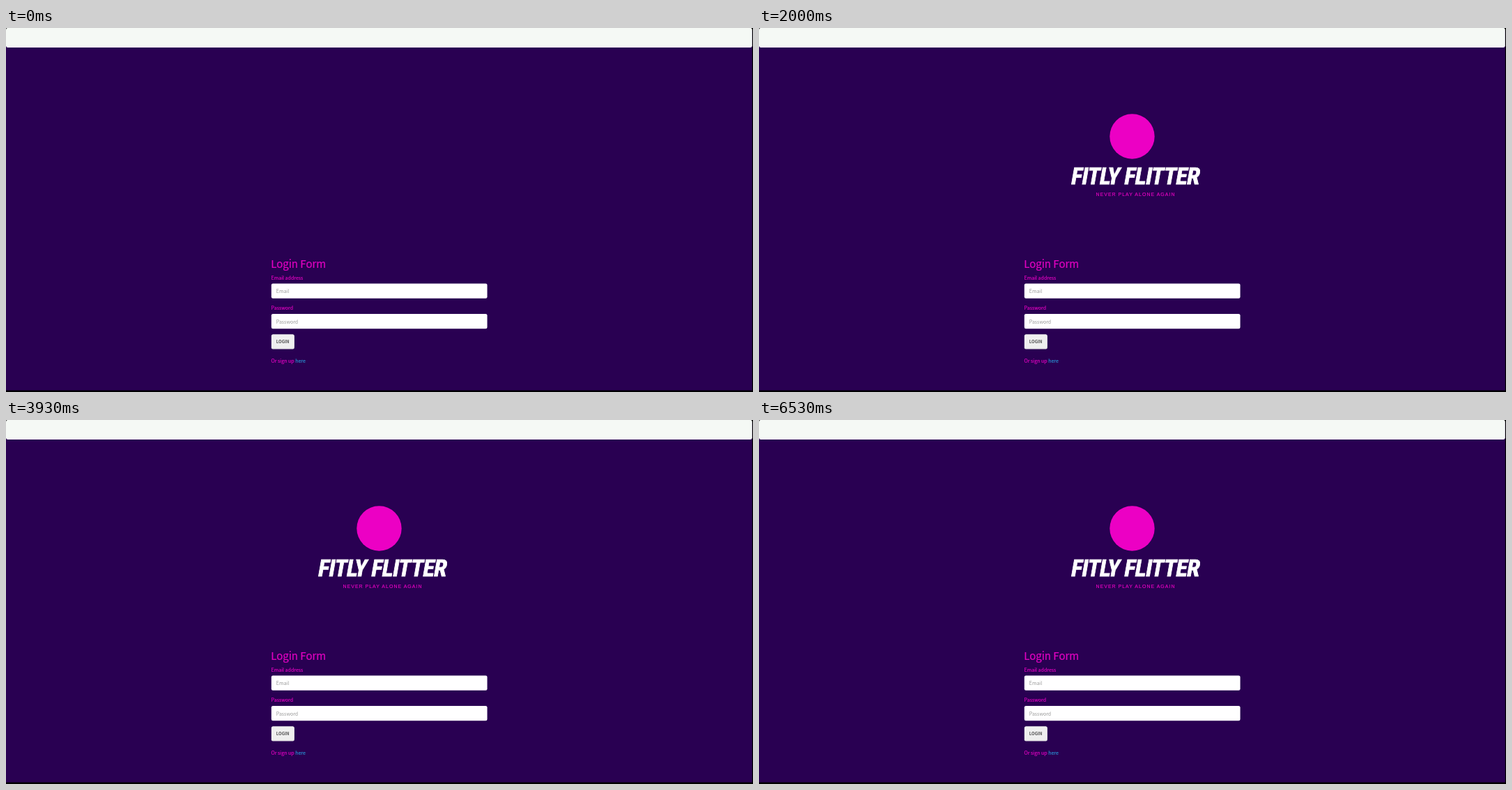
Recreate the animation shown at these times as an HTML page. Size 1072 by 522 pixels, loop 6.66 s.

```html
<!DOCTYPE html>
<html lang="en">
<head>
<meta charset="utf-8">
<title>Login</title>
<style>
  html, body { margin: 0; width: 100%; height: 100%; overflow: hidden; background: #290052; }
  svg { display: block; width: 100%; height: 100%; }

  .form { font: 400 7px "Noto Sans CJK JP", "Noto Sans CJK SC", "Noto Sans CJK", "Open Sans", sans-serif; fill: #e000c0; }
  .form .label { stroke: #e000c0; stroke-width: .16; }
  .form .head { font-size: 15px; stroke-width: .2; }
  .form .hint { fill: #999; }
  .form .link { fill: #2a8fd0; stroke: #2a8fd0; }
  .form .btn { font-size: 6px; font-weight: 700; fill: #505050; }
  .field { fill: #fff; }

  .name { font: 900 36px "Roboto Condensed", Roboto, sans-serif; font-stretch: 75%; letter-spacing: -.02em; fill: #fff; stroke: #fff; stroke-width: .8; }
  .tag { font: 400 7px "Liberation Sans", Arial, sans-serif; letter-spacing: 1px; fill: #e400c0; stroke: #e400c0; stroke-width: .16; }

  .disc { fill: #ec00c4; animation: disc 6660ms infinite; }
  .words { animation: words 6660ms infinite; }

  /* Both rise 50px while fading in, with a quadratic ease-out */
  @keyframes disc {
    0%, 11.11% { opacity: 0; transform: translateY(50px); animation-timing-function: cubic-bezier(.333, .667, .667, 1); }
    20.87%, 100% { opacity: 1; transform: none; }
  }
  @keyframes words {
    0%, 15.02% { opacity: 0; transform: translateY(50px); animation-timing-function: cubic-bezier(.333, .667, .667, 1); }
    24.77%, 100% { opacity: 1; transform: none; }
  }
</style>
</head>
<body>
<svg viewBox="0 0 1072 522" preserveAspectRatio="none">
  <rect width="1072" height="522"/>
  <rect y="4" width="1070.8" height="515.6" fill="#290052"/>
  <rect width="1070.8" height="27.9" rx="2.4" fill="#f5f9f5"/>

  <circle class="disc" cx="535.5" cy="155.5" r="32.2"/>
  <g class="words">
    <text class="name" id="name">FITLY FLITTER</text>
    <text class="tag" x="483.5" y="240.6">NEVER PLAY ALONE AGAIN</text>
  </g>

  <g class="form">
    <text class="label head" x="380.2" y="344">Login Form</text>
    <text class="label" x="380.6" y="361">Email address</text>
    <rect class="field" x="380.8" y="366.5" width="309.8" height="21.2" rx="2.2"/>
    <text class="hint" x="387.8" y="380">Email</text>
    <text class="label" x="380.6" y="404.4">Password</text>
    <rect class="field" x="380.8" y="410" width="309.8" height="21.2" rx="2.2"/>
    <text class="hint" x="387.8" y="423.5">Password</text>
    <rect x="380.8" y="439.6" width="33" height="20.8" rx="2.2" fill="#e6e6e6"/>
    <rect x="381.2" y="439.6" width="32.2" height="19.2" rx="2" fill="#efefef"/>
    <text class="btn" x="387.8" y="452">LOGIN</text>
    <text class="label" x="380.6" y="479.6">Or sign up <tspan class="link">here</tspan></text>
  </g>
</svg>
<script>
  // Pick the largest title size that fits the logo's width, centred on its line
  const title = document.getElementById('name');
  const size = Math.min(37, 36 * 184 / title.getComputedTextLength());
  const base = 211.7 + size * 0.355;
  title.style.fontSize = size + 'px';
  const left = 540.5 - title.getComputedTextLength() / 2 - size * 0.06;
  title.setAttribute('transform', `translate(${left} ${base}) skewX(-10)`);
</script>
</body>
</html>
```
